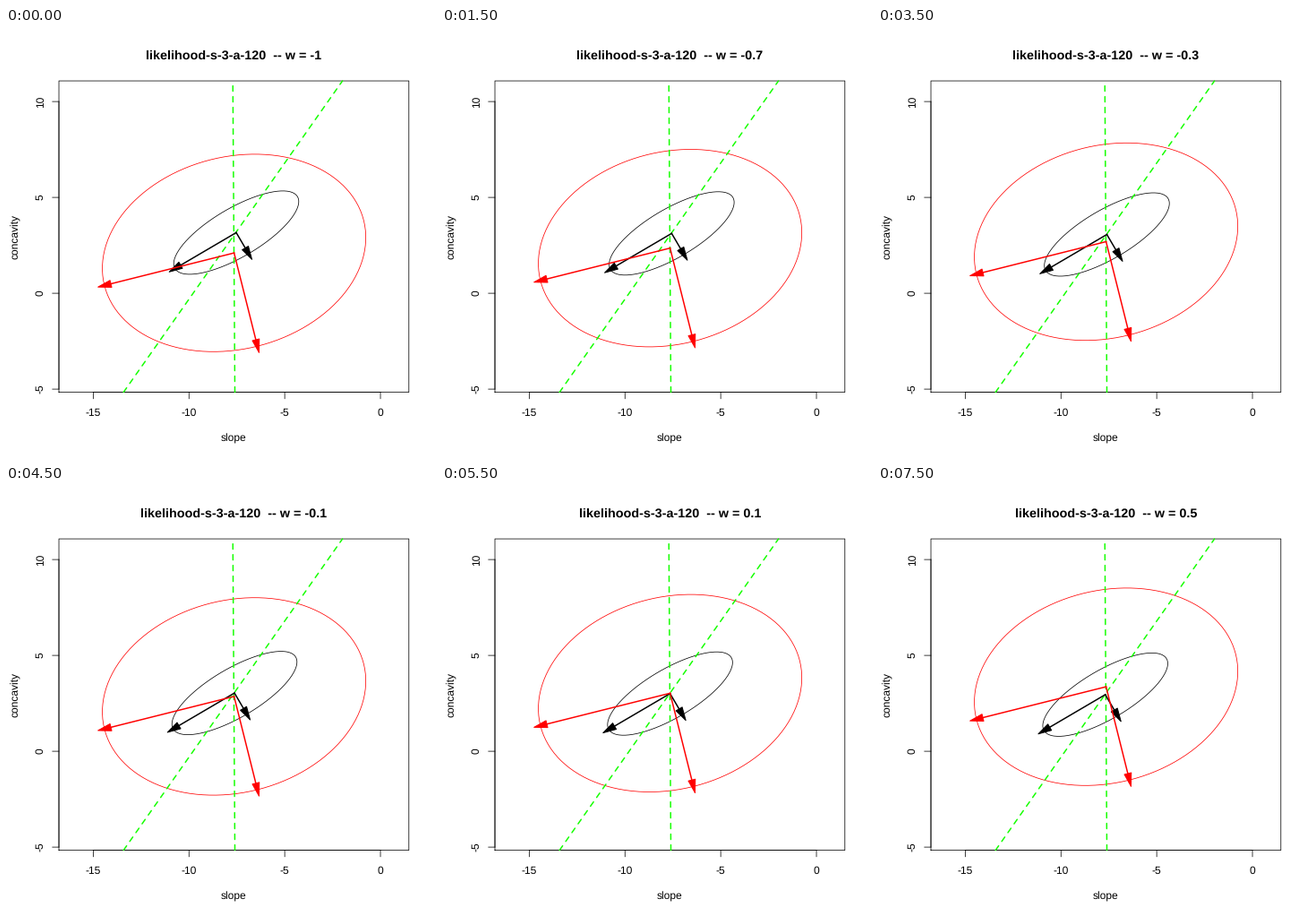
Write a matplotlib script that moves like this. It is 480x480 px and loops after 8000 ms.

```python
import numpy as np
import matplotlib.pyplot as plt
from matplotlib.animation import FuncAnimation

plt.rcParams["font.family"] = ["Liberation Sans", "DejaVu Sans"]
plt.rcParams["text.hinting"] = "none"

SIZE, DPI = 480, 72            # at 72 dpi one point is one pixel
FRAMES, INTERVAL = 16, 500
LEFT, RIGHT, TOP, BOTTOM = 59.04, 449.76, 59.04, 406.56
THIN, THICK = 0.75, 1.5
GREEN = "#14ff00"
HEAD_LEN, HEAD_HALF = 14.8, 4.0

fig = plt.figure(figsize=(SIZE / DPI, SIZE / DPI), dpi=DPI, facecolor="white")
ax = fig.add_axes([0, 0, 1, 1])
ax.set_xlim(0, SIZE)
ax.set_ylim(SIZE, 0)
ax.axis("off")


def line(xs, ys, color="black", lw=THIN, **kw):
    return ax.plot(xs, ys, color=color, lw=lw, snap=False, **kw)[0]


def label(x, y, s, size=12, **kw):
    return ax.text(x, y, s, size=size, ha="center", va="baseline",
                   rotation_mode="anchor", **kw)


def draw_axes():
    line([LEFT, RIGHT, RIGHT, LEFT, LEFT], [BOTTOM, BOTTOM, TOP, TOP, BOTTOM])
    xs = np.linspace(97.4, 418, 4)
    ys = np.linspace(82.1, 403.1, 4)
    line(xs[[0, -1]], [BOTTOM, BOTTOM])
    line([LEFT, LEFT], ys[[0, -1]])
    for x, v in zip(xs, (-15, -10, -5, 0)):
        line([x, x], [BOTTOM, BOTTOM + 7.2])
        label(x, 433, str(v))
    for y, v in zip(ys, (10, 5, 0, -5)):
        line([LEFT, LEFT - 7.2], [y, y])
        label(41.8, y, str(v), rotation=90)
    label(254.4, 462, "slope")
    label(13.8, 232.8, "concavity", rotation=90)


class Gaussian:
    """Ellipse with an arrow along each principal axis."""

    def __init__(self, color, axis, a, b, start, speed, z):
        u = np.array(axis) / np.hypot(*axis)
        v = np.array([u[1], -u[0]])
        self.start, self.speed = np.array(start), np.array(speed)
        t = np.linspace(0, 2 * np.pi, 241)[:, None]
        self.shape = a * np.cos(t) * u + b * np.sin(t) * v
        self.outline = line([], [], color, zorder=2)
        self.arrows = []
        for d, length in ((u, a), (v, b)):
            n = np.array([-d[1], d[0]]) * HEAD_HALF
            end = d * length
            tip, base = end + d * HEAD_LEN / 2, end - d * HEAD_LEN / 2
            shaft = line([], [], color, THICK, zorder=z)
            head = ax.fill([0], [0], fc=color, ec=color, lw=1,
                           joinstyle="round", zorder=z)[0]
            self.arrows.append((shaft, np.array([0 * end, end]),
                                head, np.array([tip, base + n, base - n])))

    def move(self, w):
        c = self.start + self.speed * (w + 1)
        self.outline.set_data(*(self.shape + c).T)
        for shaft, ends, head, corners in self.arrows:
            shaft.set_data(*(ends + c).T)
            head.set_xy(corners + c)


draw_axes()
for xs in ((255.5, 253.2), (131.2, 375.6)):
    line(xs, [BOTTOM, TOP], GREEN, THICK, ls=(0, (4, 4)),
         dash_capstyle="round", zorder=3)

title = label(254.4, 34.8, "", 14.4, weight="bold")
black = Gaussian("black", (-75, 44), 79.3, 27.3, (257, 228.4), (-2.2, 3.0), 4)
red = Gaussian("red", (-152.5, 38.2), 149.2, 107.3, (254.6, 251.1), (0, -18), 5)


def update(i):
    w = (i - 10) / 10
    title.set_text(f"likelihood-s-3-a-120  -- w = {w:g}")
    black.move(w)
    red.move(w)
    return ()


anim = FuncAnimation(fig, update, frames=FRAMES, interval=INTERVAL,
                     init_func=lambda: update(0), repeat=True, repeat_delay=0)
plt.show()
```
